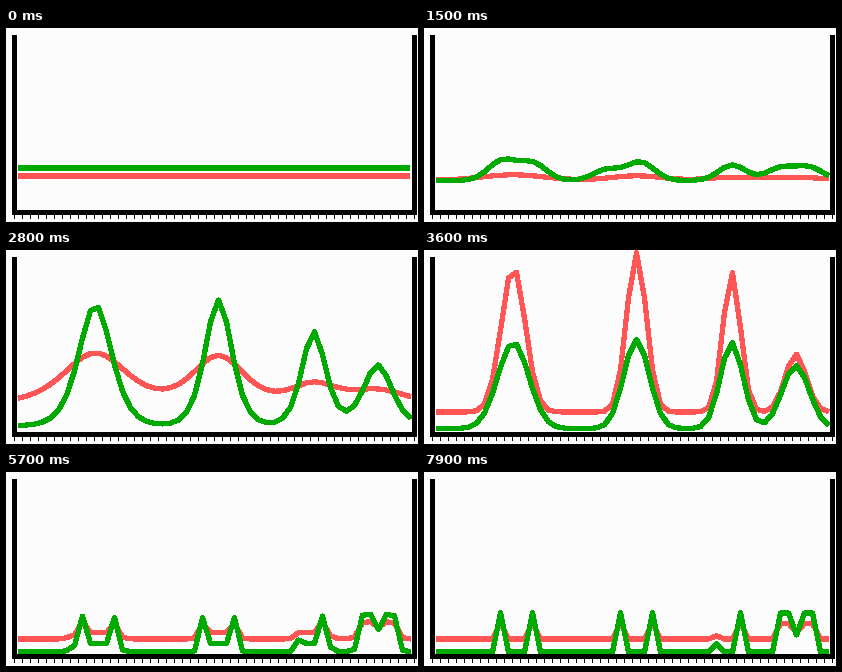
A matplotlib script that plays this animation: 412 px wide and 194 px high, repeating every 8 s.

```python
import numpy as np
import matplotlib.pyplot as plt
from matplotlib.animation import FuncAnimation
from matplotlib.patches import Rectangle

W, H, DPI = 412, 194, 100
FRAMES, STEP = 80, 100
RED, GREEN, PAPER = "#ff5555", "#00aa00", "#fcfcfc"

CELLS = np.arange(50)
X = 12.5 + 8 * CELLS

# four growth sites, their reach in cells, and the edges that outlive them
SITES = np.array([9.6, 25, 36.9, 44.9])
REACH = np.array([2.75, 2.25, 2, 2.4])
EDGES = np.array([8, 12, 23, 27, 35, 38, 43.5, 46.5])
BUDS = np.array([8.2, 12, 21.3, 25.5, 37, 43, 46.6])


def bell(power):
    return lambda z: np.exp(-np.abs(z) ** power)


def sech2(z):
    return 1 / np.cosh(z) ** 2


def tooth(z):
    return np.clip(2 - 2 * np.abs(z), 0, 1)


def hills(heights, widths, shape, at=SITES):
    """Sum of equal shapes over all cells."""
    z = (CELLS[:, None] - at) / widths
    return (heights * shape(z)).sum(axis=1)


def ease_in(p):
    return lambda u: u ** p


def ease_out(p):
    return lambda u: 1 - (1 - u) ** p


linear = ease_in(1)
flat = np.zeros(CELLS.size)

# surviving teeth: one nearly dies, the last pair keeps a shallow saddle
teeth = hills(np.where(EDGES == 35, 8, 39), 1, tooth, EDGES)
teeth[45] = 17

# (time, profile, easing towards the next profile)
green_keys = [
    (0, 139.5 - flat, linear),
    (1500, 152.5 - hills([20, 17.5, 11, 18.5, 15.5, 12.5, 13], 2.4,
                         bell(2), BUDS), ease_in(1.25)),
    (2800, 176 - hills([121, 126, 94, 61], REACH, sech2), linear),
    (3600, 178.5 - hills([86, 89, 86, 63], REACH, bell(2)), ease_out(2)),
    (4400, 179 - hills([28, 28, 28, 34], REACH * 1.15, bell(6)),
     ease_out(2.6)),
    (7900, 180 - teeth, linear),
]
red_keys = [
    (0, 147.5 - flat, linear),
    (1500, 152.3 - hills([5.5, 4.5, 3, 3], REACH * 2, bell(2)),
     ease_in(1.25)),
    (2800, 153 - hills([50, 47, 19, 13], REACH * 1.9, sech2), ease_out(2)),
    (3600, 162 - hills([145, 159, 140, 58], REACH * 0.77, bell(2)),
     ease_out(2)),
    (4400, 167 - hills(22, REACH * 1.15, bell(4)), ease_out(2.6)),
    (7900, 167 - 0.4 * teeth, linear),
]


def profile(keys, t):
    for (t0, a, ease), (t1, b, _) in zip(keys, keys[1:]):
        if t <= t1:
            return a + (b - a) * ease((t - t0) / (t1 - t0))
    return keys[-1][1]


fig = plt.figure(figsize=(W / DPI, H / DPI), dpi=DPI, facecolor=PAPER)
ax = fig.add_axes([0, 0, 1, 1])
ax.set(xlim=(0, W), ylim=(H, 0))
ax.axis("off")


def curve(color):
    return ax.plot(X, X, color=color, lw=4.2 * 72 / DPI, antialiased=False,
                   solid_joinstyle="round", solid_capstyle="butt")[0]


def box(x, y, w, h):
    ax.add_patch(Rectangle((x, y), w, h, fc="black", lw=0, zorder=3,
                           antialiased=False))


red, green = curve(RED), curve(GREEN)
box(6, 7, 5, 180)
box(406, 7, 5, 180)
box(6, 182, 405, 5)
for x in range(8, 409, 8):
    box(x, 187, 1, 4)


def draw(i):
    t = i * STEP
    # the level field sags before its pattern emerges
    sag = 2.7 * np.sin(np.pi * min(t / 1500, 1))
    red.set_ydata(profile(red_keys, t))
    green.set_ydata(profile(green_keys, t) + sag)
    return red, green


anim = FuncAnimation(fig, draw, frames=FRAMES, interval=STEP, repeat=True,
                     repeat_delay=0)
plt.show()
```
